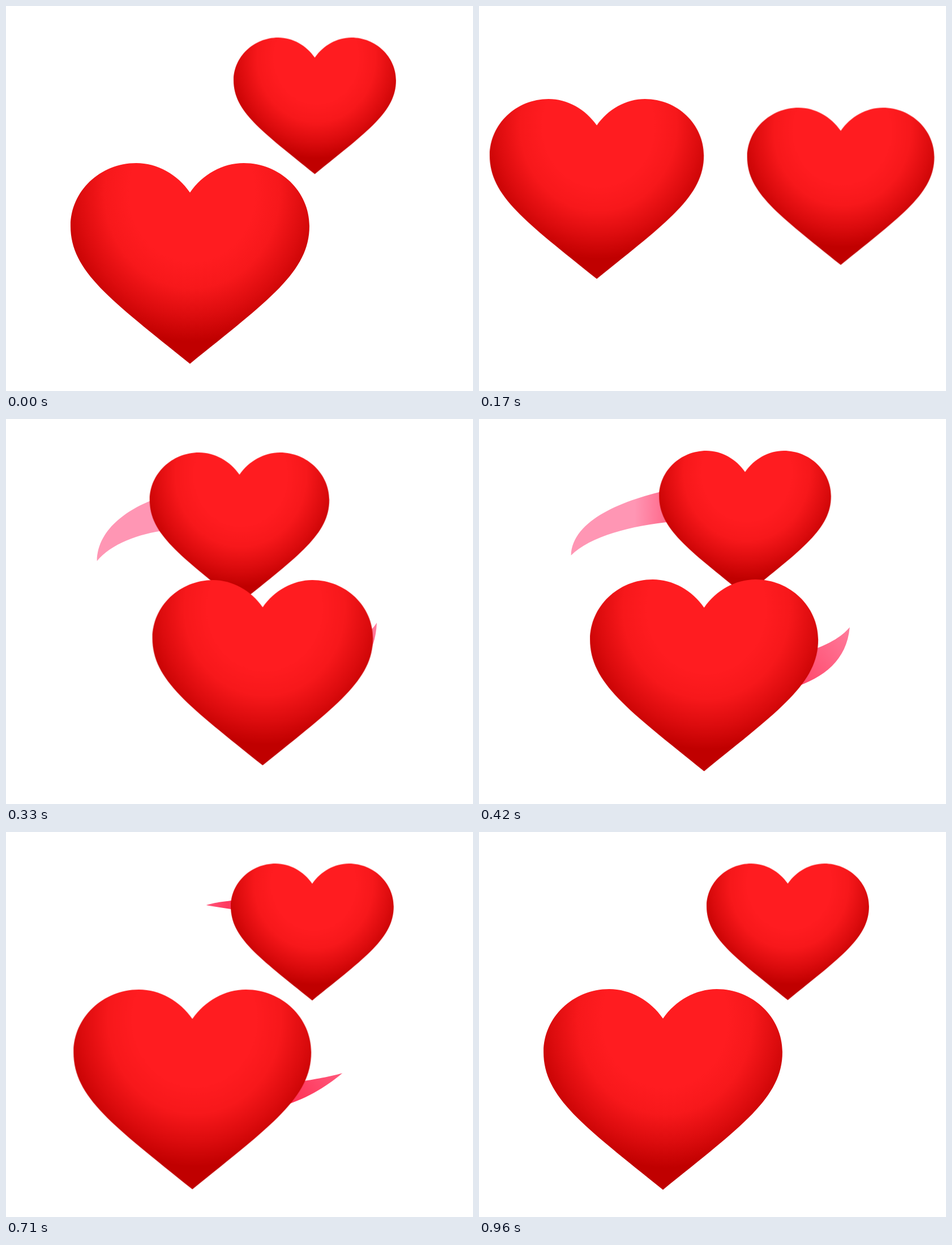
Animation of 825 by 679 pixels, one loop 1 s. Source, as an HTML page without scripts:

```html
<!DOCTYPE html>
<html lang="en">
<head>
<meta charset="utf-8">
<title>Revolving hearts</title>
<style>
  html, body { margin: 0; width: 100%; height: 100%; overflow: hidden; background: #fff; }
  svg { display: block; width: 100%; height: 100%; }

  /* Each loop is half a turn: the hearts trade places. */
  .heart { offset-rotate: 0deg; animation: 1s infinite; }
  .receding {
    offset-path: path("M325 454C260 454 203 394 208 322.5C211 270 275 236 332.5 213.5C395 190 480 181 545.5 176");
    animation-name: orbit, shrink;
  }
  .nearing {
    offset-path: path("M545.5 176C600 176 642 240 639 318C636 372 585 418 532 432.5C475 450 385 454 325 454");
    animation-name: orbit, grow;
  }

  @keyframes orbit {
    0%  { offset-distance: 0%; animation-timing-function: cubic-bezier(.33, 0, .67, .2); }
    17% { offset-distance: 33%; animation-timing-function: cubic-bezier(.33, .39, .67, .8); }
    25% { offset-distance: 62.8%; animation-timing-function: cubic-bezier(.33, .53, .67, .78); }
    42% { offset-distance: 87%; animation-timing-function: cubic-bezier(.33, .53, .67, .83); }
    58% { offset-distance: 96.3%; animation-timing-function: cubic-bezier(.33, .56, .67, .81); }
    71% { offset-distance: 99.2%; animation-timing-function: cubic-bezier(.33, .9, .67, 1); }
    96%, 100% { offset-distance: 100%; }
  }
  @keyframes shrink {
    0%  { transform: scale(1); animation-timing-function: cubic-bezier(.33, 0, .67, .2); }
    17% { transform: scale(.898); animation-timing-function: cubic-bezier(.33, .39, .67, .8); }
    25% { transform: scale(.799); animation-timing-function: cubic-bezier(.33, .53, .67, .78); }
    42% { transform: scale(.72); animation-timing-function: cubic-bezier(.33, .53, .67, .83); }
    58% { transform: scale(.69); animation-timing-function: cubic-bezier(.33, .56, .67, .81); }
    71% { transform: scale(.682); animation-timing-function: cubic-bezier(.33, .9, .67, 1); }
    96%, 100% { transform: scale(.68); }
  }
  @keyframes grow {
    0%  { transform: scale(.68); animation-timing-function: cubic-bezier(.33, 0, .67, .2); }
    17% { transform: scale(.782); animation-timing-function: cubic-bezier(.33, .39, .67, .8); }
    25% { transform: scale(.877); animation-timing-function: cubic-bezier(.33, .53, .67, .78); }
    42% { transform: scale(.955); animation-timing-function: cubic-bezier(.33, .53, .67, .83); }
    58% { transform: scale(.986); animation-timing-function: cubic-bezier(.33, .56, .67, .81); }
    71% { transform: scale(.995); animation-timing-function: cubic-bezier(.33, .9, .67, 1); }
    96%, 100% { transform: scale(1); }
  }

  /* Ribbons appear mid-turn, then slip in behind their heart. */
  .trail { animation: 1s linear infinite; }
  .back  { fill: url(#backFill); animation-name: show, backTrail; }
  .front { fill: url(#frontFill); animation-name: show, frontTrail; }

  @keyframes show {
    0% { opacity: 0; animation-timing-function: step-end; }
    28%, 82% { opacity: 1; animation-timing-function: step-end; }
    83%, 100% { opacity: 0; }
  }
  @keyframes backTrail {
    0%, 28% { d: path("M160 256C160 200 200 160 250 140L250 205C215 210 180 228 160 256Z"); }
    42% { d: path("M162 241C164 178 255 142 340 124L340 181C270 188 195 207 162 241Z"); }
    58% { d: path("M258 163C290 142 340 131 400 125L400 166C360 164 310 163 258 163Z"); }
    71% { d: path("M353 129C370 124 385 122 420 119L420 139C395 136 375 133 353 129Z"); }
    82%, 100% { d: path("M425 126C430 125 435 124 440 123L440 129C435 128 430 127 425 126Z"); }
  }
  @keyframes frontTrail {
    0%, 28% { d: path("M655 355C645 375 630 385 600 395L590 460C630 440 655 410 655 355Z"); }
    42% { d: path("M655 367C640 385 615 399 580 410L555 474C610 456 650 425 655 367Z"); }
    58% { d: path("M639 397C610 416 580 425 535 432L490 494C560 475 605 452 639 397Z"); }
    71% { d: path("M595 425C570 432 550 435 515 441L480 486C530 472 565 450 595 425Z"); }
    82%, 100% { d: path("M515 445C505 447 500 448 490 450L470 470C485 465 500 455 515 445Z"); }
  }
</style>
</head>
<body>
<svg viewBox="0 0 825 679">
  <defs>
    <radialGradient id="red" gradientUnits="userSpaceOnUse" cx="4" cy="-124" r="262" gradientTransform="scale(.92 1)">
      <stop offset=".46" stop-color="#ff1c20"/>
      <stop offset=".64" stop-color="#f7181b"/>
      <stop offset=".83" stop-color="#dc0c0e"/>
      <stop offset="1" stop-color="#c00000"/>
    </radialGradient>
    <linearGradient id="backFill" gradientUnits="userSpaceOnUse" x1="275" y1="0" x2="390" y2="0">
      <stop stop-color="#ff96b4"/>
      <stop offset="1" stop-color="#ff3a60"/>
    </linearGradient>
    <linearGradient id="frontFill" gradientUnits="userSpaceOnUse" x1="655" y1="367" x2="515" y2="480">
      <stop stop-color="#ff7c9c"/>
      <stop offset="1" stop-color="#ff3358"/>
    </linearGradient>
    <path id="heart" fill="url(#red)" d="M0-125C-22-157-58-177-95-177C-159-177-211-127-211-66C-211 14-140 64 0 177C140 64 211 14 211-66C211-127 159-177 95-177C58-177 22-157 0-125Z"/>
  </defs>
  <path class="trail back"/>
  <path class="trail front"/>
  <g class="heart receding"><use href="#heart"/></g>
  <g class="heart nearing"><use href="#heart"/></g>
</svg>
</body>
</html>
```
